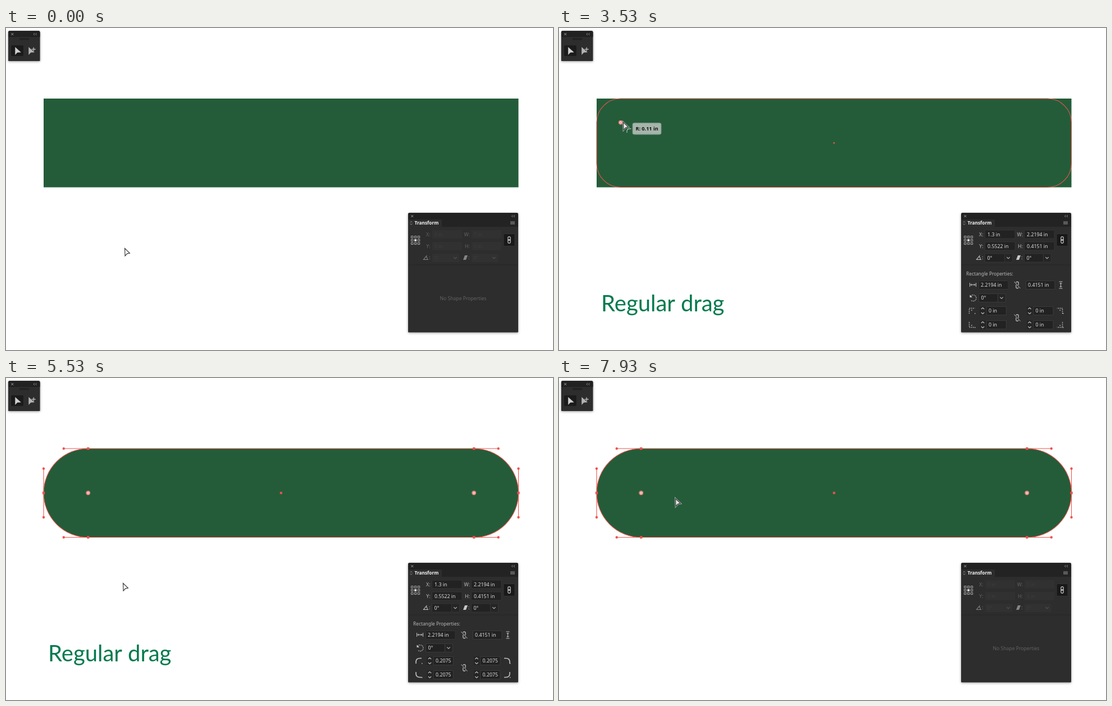
An HTML page with a canvas for the animation above (8000 ms loop, 974x575 px).

```html
<!DOCTYPE html>
<html lang="en">
<head>
<meta charset="utf-8">
<title>Corner radius drag</title>
<style>
html, body { margin: 0; width: 100%; height: 100%; overflow: hidden; background: #fff; }
canvas { display: block; width: 974px; height: 575px; }
</style>
</head>
<body>
<canvas id="stage"></canvas>
<script>
const W = 974, H = 575, LOOP = 8000;
const RED = '#f0524c', GREEN = '#245c39', ICON = '#c4c4c4', DIM = '#626262';
const UI = '"Noto Sans", "Open Sans", sans-serif';
const BOX = { x: 67, y: 126, w: 845.5, h: 158.5 };
const PX_PER_INCH = 381;

const canvas = document.getElementById('stage');
const c = canvas.getContext('2d');
const dpr = window.devicePixelRatio || 1;
canvas.width = W * dpr;
canvas.height = H * dpr;

// Each key is [time, ...values]
const CURSOR = [
  [0, 211, 393], [870, 211, 393], [1130, 202, 220], [1400, 202, 220],
  [1670, 120, 173], [1900, 91, 149], [2200, 79, 139], [2300, 79, 139],
  [2700, 87, 147], [2800, 89, 149], [4000, 130, 180], [4270, 156, 197],
  [4730, 197, 216], [4870, 197, 216], [4930, 198, 217], [5070, 198, 217],
  [5470, 208, 366], [5930, 208, 366], [6000, 211, 366], [7200, 211, 366],
  [7530, 211, 215], [7800, 211, 215], [7930, 207, 215]
];
const RADIUS = [[2300, 0], [2800, 19.5], [4270, 66.4], [4680, 79.25]];
const TITLE = [[2370, 0], [3370, 1], [6430, 1], [7430, 0]];

function at(keys, t) {
  const next = keys.findIndex(k => k[0] > t);
  if (next === 0) return keys[0].slice(1);
  if (next < 0) return keys[keys.length - 1].slice(1);
  const a = keys[next - 1], b = keys[next], f = (t - a[0]) / (b[0] - a[0]);
  return a.slice(1).map((v, i) => v + (b[i + 1] - v) * f);
}

function rect(x, y, w, h, fill, stroke, r = 0) {
  c.beginPath();
  c.roundRect(x, y, w, h, r);
  if (fill) { c.fillStyle = fill; c.fill(); }
  if (stroke) { c.strokeStyle = stroke; c.stroke(); }
}

function dot(x, y, r, fill, stroke) {
  c.beginPath();
  c.arc(x, y, r, 0, 7);
  c.fillStyle = fill;
  c.fill();
  if (stroke) { c.strokeStyle = stroke; c.stroke(); }
}

function path(d, x, y, stroke, width = 1, fill) {
  c.save();
  c.translate(x, y);
  const p = new Path2D(d);
  if (fill) { c.fillStyle = fill; c.fill(p); }
  if (stroke) { c.strokeStyle = stroke; c.lineWidth = width; c.stroke(p); }
  c.restore();
}

function text(s, x, y, color, size = 8.8, weight = 400, align = 'left') {
  c.font = `${weight} ${size}px ${UI}`;
  c.textAlign = align;
  c.fillStyle = color;
  c.fillText(s, x, y);
}

const square = (x, y, s = 4.4) => rect(x - s / 2, y - s / 2, s, s, RED);

function widget(x, y) {
  dot(x, y, 3.7, '#fff');
  c.lineWidth = 1.2;
  dot(x, y, 2.9, '#fff', RED);
  dot(x, y, 1.1, RED);
}

function frame(x, y, w, h, header) {
  c.save();
  c.shadowColor = 'rgba(0,0,0,.4)';
  c.shadowBlur = 4 * dpr;
  c.shadowOffsetY = dpr;
  rect(x, y, w, h, '#2d2d2d', null, [3, 3, 1, 1]);
  c.restore();
  rect(x, y, w, header, '#212121', null, [3, 3, 0, 0]);
  path('M-2 -2L2 2M2 -2L-2 2', x + 7.3, y + 6, '#aaa', 0.9);
  path('M-.5 -2L-2.5 0L-.5 2M3 -2L1 0L3 2', x + w - 9, y + 6, '#999', 0.9);
}

function toolbar() {
  frame(4, 5, 56.5, 54, 11);
  rect(24, 18, 17, 3.5, '#222');
  rect(9, 31, 22, 19, '#1b1b1b', null, 2);
  const arrow = 'M0 0V14L4 9.8L10.5 9.5Z';
  path(arrow, 16.3, 34, null, 0, '#d0d0d0');
  path(arrow, 40.3, 34, null, 0, '#b5b5b5');
  path('M0 -3.5V3.5M-3.5 0H3.5', 49.2, 38, '#b5b5b5', 1.4);
}

function field(x, y, w, value, enabled = true, inset = 5) {
  rect(x, y - 7.5, w, 15, enabled ? '#222' : '#313131', enabled ? '#393939' : null, 1);
  text(value, x + inset, y + 3, enabled ? '#dedede' : '#3c3c3c');
}

function dropdown(x, y, w, enabled) {
  field(x, y, w, '0°', enabled, 4);
  rect(x + w, y - 7.5, 14, 15, enabled ? '#252525' : '#313131', enabled ? '#393939' : null, 1);
  path('M-2.7 -1.3L0 1.3L2.7 -1.3', x + w + 6.5, y, enabled ? ICON : '#555', 1.1);
}

function link(x, y, broken) {
  c.lineWidth = 1.2;
  rect(x - 2.2, y - 5.8, 4.4, 6.6, null, ICON, 2.2);
  rect(x - 2.2, y - 0.8, 4.4, 6.6, null, ICON, 2.2);
  if (!broken) return;
  path('M-5.5 -6L5.5 6', x, y, '#2d2d2d', 3);
  path('M-5.5 -6L5.5 6', x, y, ICON, 1);
}

function cornerIcon(x, y, flipX, flipY, rounded) {
  c.save();
  c.translate(x, y);
  c.scale(flipX, flipY);
  if (rounded) {
    path('M-5 5V2Q-5 -4.5 2 -4.5H5', 0, 0, ICON, 1.6);
  } else {
    c.setLineDash([1.6, 1.6]);
    path('M-4.5 5V-4.5H5.5M-1 -1H.6', 0, 0, ICON, 1.5);
  }
  c.restore();
  rect(x + 5, y + 4, 1.4, 1.4, ICON);
}

function shapeProperties(rounded) {
  text('Rectangle Properties:', 725, 442, '#b8b8b8', 8.35);
  path('M-5.5 -3.5V3.5M5.5 -3.5V3.5M-4 0H4M-2 -2L-4 0L-2 2M2 -2L4 0L2 2', 737, 458.5, ICON);
  field(747.5, 459, 52.5, '2.2194 in', true, 3.5);
  link(816, 459, true);
  field(831.5, 459, 51.5, '0.4151 in', true, 3.5);
  path('M-3 -6H3M-3 6H3M0 -4V4M-2 -2L0 -4L2 -2M-2 2L0 4L2 2', 893.5, 459, ICON);
  c.setLineDash([1.7, 1.2]);
  path('M-4.5 -3A5.5 5.5 0 1 1 -4 4', 737.5, 482, ICON, 1.2);
  c.setLineDash([]);
  path('M-6 -5.5V-1H-1.5Z', 737.5, 482, null, 0, ICON);
  dropdown(747.5, 482, 34, true);
  link(816, 517.5, true);
  for (const [y, flipY] of [[505, 1], [530, -1]]) {
    for (const [icon, step, box, flipX] of [[735, 754.5, 761, 1], [892, 838, 844.5, -1]]) {
      cornerIcon(icon, y, flipX, flipY, rounded);
      rect(step - 5, y - 7.5, 11, 15, '#252525');
      path('M-2.7 -3L0 -5.5L2.7 -3M-2.7 3L0 5.5L2.7 3', step, y, ICON, 1.1);
      field(box, y, 35.5, rounded ? '0.2075' : '0 in', true, 4);
    }
  }
}

// mode: 'on' while a shape is selected, 'fading' just after deselecting, 'off' otherwise
function transformPanel(mode, rounded) {
  const on = mode === 'on', angleOn = mode !== 'off';
  frame(716, 330, 196, 213.5, 12);
  rect(716, 342, 196, 13, '#232323');
  rect(716, 342, 60, 13.5, '#2d2d2d');
  path('M-1.8 -1L0 -3L1.8 -1M-1.8 1L0 3L1.8 1', 721.5, 348.3, '#aaa', 0.8);
  text('Transform', 727.5, 351.3, '#f4f4f4', 8.3, 700);
  path('M0 0H8M0 2H8M0 4H8', 898, 346, '#9a9a9a', 0.9);

  c.lineWidth = 0.9;
  for (let i = 0; i < 9; i++) {
    const x = 721.5 + 5.9 * (i % 3), y = 371.5 + 5.8 * Math.floor(i / 3);
    rect(x, y, 3.4, 3.4, i === 4 ? '#fff' : null, '#b4b4b4');
  }

  const label = on ? '#bbb' : DIM;
  const kept = mode !== 'off';
  c.lineWidth = 0.8;
  const rows = [
    [368.5, 'X:', '1.3 in', 'W:', '2.2194 in'],
    [389.5, 'Y:', '0.5522 in', 'H:', '0.4151 in']
  ];
  for (const [y, left, leftValue, right, rightValue] of rows) {
    text(left, 755.5, y + 3, label, 8.8, 400, 'right');
    field(758.5, y, 53.5, kept ? leftValue : '0 in', on, 4.5);
    text(right, 826, y + 3, label, 8.8, 400, 'right');
    field(828.5, y, 53.5, kept ? rightValue : '0 in', on, 4.5);
  }

  const mark = angleOn ? '#c8c8c8' : '#858585';
  path('M6 -4L0 3.5H8.5M4.5 -2Q7 0 6.8 3.5', 743.5, 410, mark, 1.1);
  path('M3 -4H8L5 4H0Z', 814, 410, null, 0, mark);
  text(':', 753, 413, mark);
  text(':', 823, 413, mark);
  c.lineWidth = 0.8;
  dropdown(758.5, 410.5, 35, angleOn);
  dropdown(828.5, 410.5, 34, angleOn);
  if (mode === 'fading') {
    rect(828.5, 403, 34, 15, '#333', '#484848');
    text('0°', 832.5, 413.5, '#6a6a6a');
  }

  rect(886, 367.5, 20, 22, '#191919', '#383838', 2);
  link(896, 378.5, false);
  rect(716, 422.5, 196, 1, '#262626');
  c.lineWidth = 0.8;
  if (on) shapeProperties(rounded);
  else text('No Shape Properties', 814, 486.3, DIM, 8.6, 400, 'center');
}

function outline(r) {
  c.lineWidth = 1.1;
  rect(BOX.x, BOX.y, BOX.w, BOX.h, null, RED, r);
}

function selection(rounded) {
  const { x, y, w, h } = BOX, r = h / 2, right = x + w, bottom = y + h;
  outline(rounded ? r : 0);
  square(x + w / 2, y + r, 4);
  for (const [cx, dir] of [[x, 1], [right, -1]]) {
    if (!rounded) {
      for (const [cy, down] of [[y, 1], [bottom, -1]]) {
        square(cx, cy, 4.6);
        widget(cx + dir * 11.5, cy + down * 11.5);
      }
      continue;
    }
    const anchor = cx + dir * r, end = cx + dir * (r - 43.5);
    for (const cy of [y, bottom]) {
      path(`M${anchor} ${cy}H${end}`, 0, 0, RED, 1.1);
      square(anchor, cy);
      dot(end, cy, 2.2, RED);
    }
    path(`M${cx} ${y + r - 43.5}v87`, 0, 0, RED, 1.1);
    square(cx, y + r);
    dot(cx, y + r - 43.5, 2.2, RED);
    dot(cx, y + r + 43.5, 2.2, RED);
    widget(anchor, y + r);
  }
}

function drag(t) {
  const [r] = at(RADIUS, t), offset = Math.max(11.5, r);
  outline(r);
  square(BOX.x + BOX.w / 2, BOX.y + BOX.h / 2, 2.6);
  widget(BOX.x + offset, BOX.y + offset);

  // The hint trails slightly behind the pointer
  const [x, y] = at(CURSOR, t - 80);
  rect(x + 20, y + 4, 50.5, 20, '#a5b5aa', '#8fa096', 3);
  text(`R: ${(r / PX_PER_INCH).toFixed(2)} in`, x + 45.3, y + 17.3, '#111', 9.1, 600, 'center');
}

function pointer(t, dragging) {
  const [x, y] = at(CURSOR, t);
  const arrow = 'M.5 .5L9.3 9L4.8 9.8L1 14Z';
  const onShape = y < BOX.y + BOX.h;
  if (onShape) path(arrow, x, y, '#a9b9af', 2.8);
  path(arrow, x, y, '#3a3a3a', 1.2, onShape ? '#f1e9ec' : '#fff');
  if (dragging) path('M7 19V16Q7.5 12 11.5 12H14.5', x, y, '#bac9c0', 1.1);
}

function draw(t) {
  c.setTransform(dpr, 0, 0, dpr, 0, 0);
  c.fillStyle = '#fff';
  c.fillRect(0, 0, W, H);

  const rounded = t >= 5070;
  const dragging = t >= 2300 && t < 5070;
  const selected = (t >= 1400 && t < 5930) || t >= 7800;
  const hovering = at(CURSOR, t)[1] < BOX.y + BOX.h;
  const radius = rounded ? BOX.h / 2 : 0;

  rect(BOX.x, BOX.y, BOX.w, BOX.h, GREEN, null, radius);
  toolbar();
  transformPanel(t >= 1870 && t < 6400 ? 'on' : t >= 6400 && t < 6730 ? 'fading' : 'off', t >= 5330);

  const [alpha] = at(TITLE, t);
  c.globalAlpha = alpha;
  c.font = '40px Lato, sans-serif';
  c.textAlign = 'left';
  c.fillStyle = '#007a4d';
  c.fillText('Regular drag', 75, 505.5);
  c.globalAlpha = 1;

  if (dragging) drag(t);
  else if (selected) selection(rounded);
  else if (hovering) outline(radius);
  pointer(t, dragging);
}

function tick() {
  draw(performance.now() % LOOP);
  requestAnimationFrame(tick);
}
tick();
</script>
</body>
</html>
```
